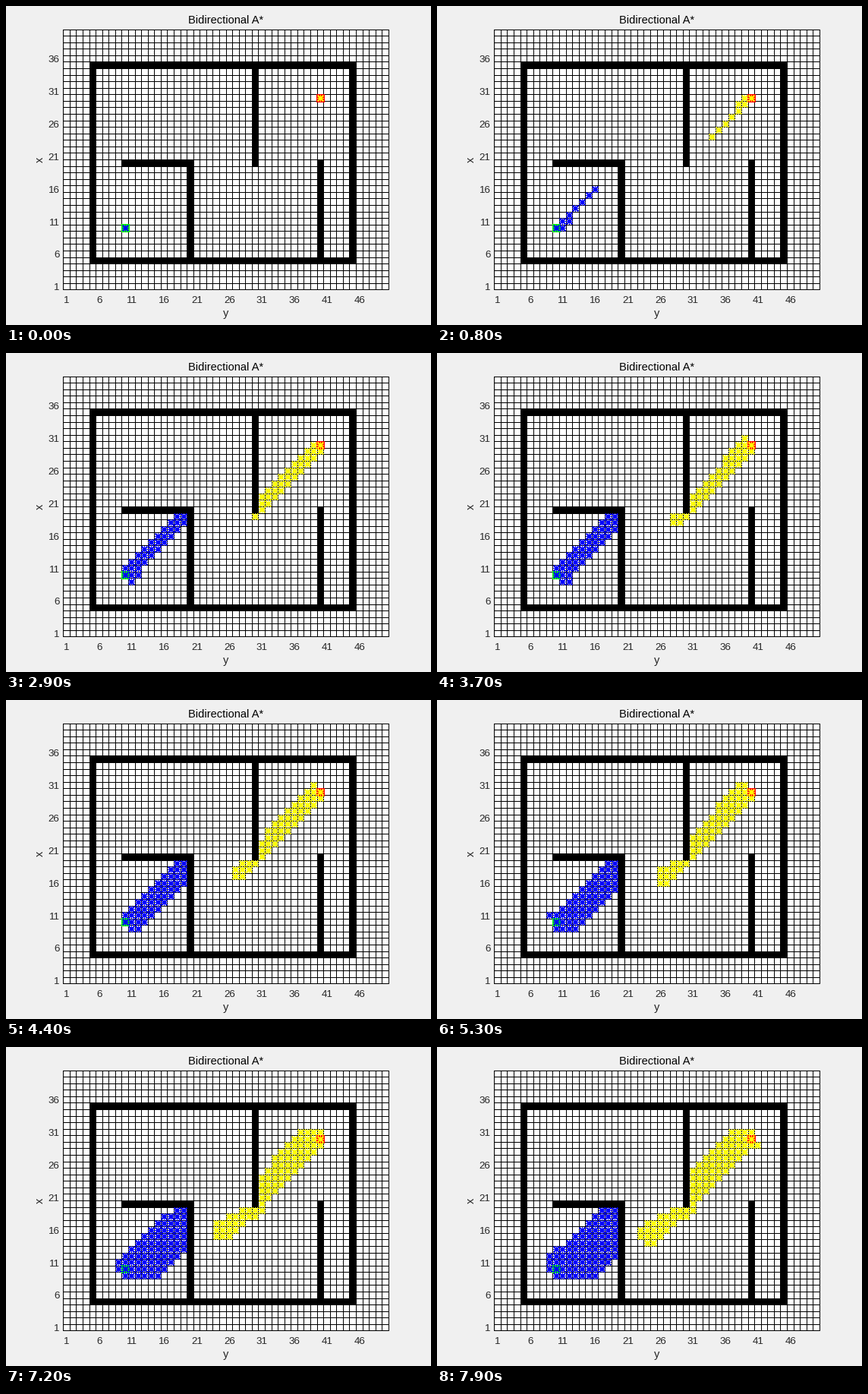
These frames come from a looping animation (560x420 px, 8 s). A matplotlib script:

```python
from math import floor, hypot

import matplotlib.pyplot as plt
from matplotlib.animation import FuncAnimation
from matplotlib.collections import LineCollection
from matplotlib.patches import Rectangle

W, H, DPI = 560, 420, 100
PX = 72 / DPI                      # one pixel in points
COLS, ROWS, PITCH = 50, 40, 8.572
X0, Y0 = 71.46, 378.22             # pixel position of cell index 0
FRAMES, STEP_MS = 80, 100
START, GOAL = (10, 10), (40, 30)
INK = "#262626"

# Wall bars as (first col, first row, last col, last row)
WALLS = [
    (5, 5, 45, 5), (5, 35, 45, 35), (5, 5, 5, 35), (45, 5, 45, 35),
    (10, 20, 20, 20), (20, 5, 20, 20), (30, 20, 30, 35), (40, 5, 40, 20),
]
BLOCKED = {(c, r) for c0, r0, c1, r1 in WALLS
           for c in range(c0, c1 + 1) for r in range(r0, r1 + 1)}


def px(col):
    return X0 + PITCH * col


def py(row):
    return Y0 - PITCH * row


def expansion(start, goal, count):
    """Cells in the order the search closes them."""
    def h(c):
        return hypot(c[0] - goal[0], c[1] - goal[1])

    cost, rank, closed = {start: 0.0}, {start: h(start)}, []
    while len(closed) < count:
        cell = min(rank, key=rank.get)
        del rank[cell]
        closed.append(cell)
        for dx in (-1, 0, 1):
            for dy in (-1, 0, 1):
                n = (cell[0] + dx, cell[1] + dy)
                if n in BLOCKED or n in closed:
                    continue
                g = cost[cell] + hypot(dx, dy)
                if n not in cost:
                    cost[n], rank[n] = g, g + h(n)
                elif g < cost[n]:
                    cost[n] = g    # the rank keeps its first value
    return closed


def star(cell):
    """Four strokes of an asterisk centred on a whole pixel."""
    x, y = floor(px(cell[0])) + 0.5, floor(py(cell[1])) + 0.5
    arms = [(4.5, 0), (0, 4.5), (3.5, 3.5), (3.5, -3.5)]
    return [[(x - a, y - b), (x + a, y + b)] for a, b in arms]


fig = plt.figure(figsize=(W / DPI, H / DPI), dpi=DPI, facecolor="#f0f0f0")
ax = fig.add_axes([0, 0, 1, 1])
ax.set_xlim(0, W)
ax.set_ylim(H, 0)
ax.axis("off")


def box(x0, y0, x1, y1, color, z):
    ax.add_patch(Rectangle((x0, y0), x1 - x0, y1 - y0, fc=color, ec="none",
                           lw=0, antialiased=False, zorder=z))


def strokes(segments, color, z):
    lines = LineCollection(segments, colors=color, linewidths=PX,
                           antialiaseds=False, zorder=z)
    lines.set_snap(False)
    return ax.add_collection(lines, autolim=False)


def label(x, y, text, size, color=INK, **kw):
    ax.text(x, y, text, fontsize=size * PX, color=color,
            family="Liberation Sans", **kw)


# Board
xs = [floor(px(k + 0.5)) for k in range(COLS + 1)]
ys = [floor(py(k + 0.5)) for k in range(ROWS + 1)]
left, right, top, bottom = xs[0], xs[-1] + 1, ys[-1], ys[0] + 1
box(left, top, right, bottom, "white", 1)
strokes([[(x + 0.5, top), (x + 0.5, bottom)] for x in xs]
        + [[(left, y + 0.5), (right, y + 0.5)] for y in ys], "black", 2)
for c0, r0, c1, r1 in WALLS:
    box(xs[c0 - 1], ys[r1], xs[c1] + 1, ys[r0 - 1] + 1, "black", 3)
for (c, r), color in ((START, "#00ff00"), (GOAL, "#ff0000")):
    x, y = floor(px(c)), floor(py(r))
    box(x - 5, y - 5, x + 6, y + 6, color, 4)

# Labels
label(290, 23, "Bidirectional A*", 14.67, "black", ha="center", va="baseline")
for c in range(1, COLS, 5):
    label(px(c), 391, str(c), 13.33, ha="center", va="baseline")
for r in range(1, ROWS, 5):
    label(70.5, py(r) + 4.6, str(r), 13.33, ha="right", va="baseline")
label(290, 409.5, "y", 14.67, ha="center", va="baseline")
label(44.5, 202, "x", 14.67, ha="center", va="center", rotation=90)

# Search fronts
fronts = []
for a, b, color in ((START, GOAL, "#0000ff"), (GOAL, START, "#ffff00")):
    stars = [star(c) for c in expansion(a, b, FRAMES)]
    fronts.append((strokes([], color, 5), stars))


def update(i):
    for lines, stars in fronts:
        lines.set_segments([s for st in stars[:i + 1] for s in st])
    return [lines for lines, _ in fronts]


anim = FuncAnimation(fig, update, frames=FRAMES, interval=STEP_MS,
                     repeat=True, repeat_delay=0, blit=False)
plt.show()
```
